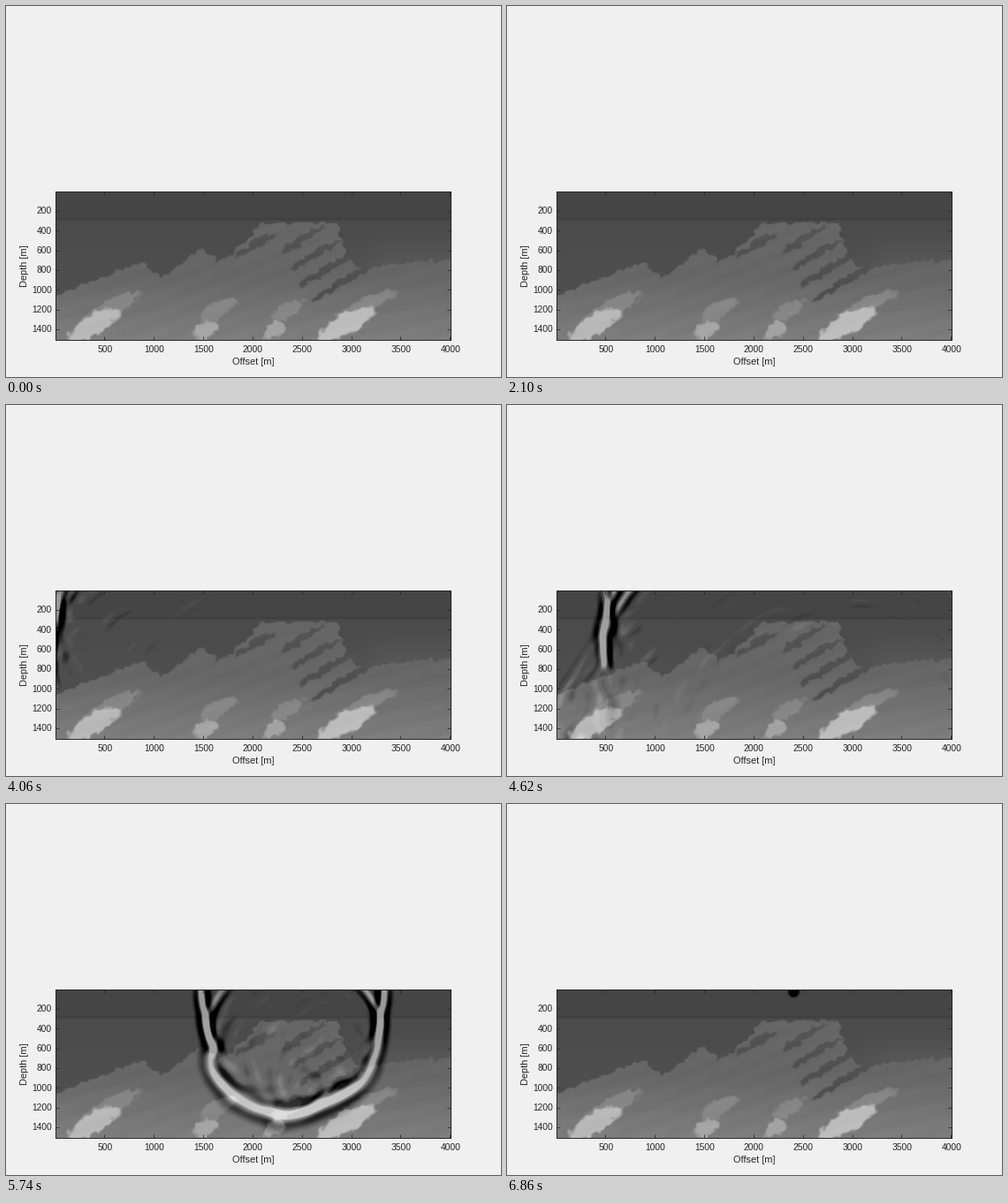
A matplotlib script that plays this animation: 560x420 px, repeating every 7 s.

```python
import numpy as np
import matplotlib.pyplot as plt
from matplotlib.animation import FuncAnimation

W, H, DPI = 560, 420, 100
X0, Y0, NX, NZ = 56, 210, 447, 168      # image box on the stage, in pixels
FRAMES, INTERVAL = 50, 140
DX = 8.95                               # metres per pixel
SPEED = 21.7                            # m/s per grey level
PAD = 45
SUB, FRAME_DT = 64, 0.0815              # solver steps and seconds per frame
LIVE = 34                               # frames with a visible wave
INK = "#262626"

rng = np.random.default_rng(4)
X, Y = np.meshgrid(np.arange(NX) + X0 + 0.5, np.arange(NZ) + Y0 + 0.5)


def blur(a, n):
    for _ in range(n):
        p = np.pad(a, 1, mode="edge")
        a = (p[:-2, 1:-1] + p[2:, 1:-1] + p[1:-1, :-2] + p[1:-1, 2:]
             + 2 * a) / 6
    return a


def noise(n):
    a = blur(rng.standard_normal((NZ, NX)), n)
    return a / a.std()


# ragged coordinates give the layers uneven edges
RX, RY = X + 1.5 * noise(16), Y + 1.2 * noise(10)


def lens(cx, cy, length, thick, slope=0.58, bend=0.002):
    """Soft mask of a dipping, slightly bowed lens."""
    s = np.hypot(1, slope)
    u = (RX - cx - slope * (RY - cy)) / s
    w = (RY - cy + slope * (RX - cx)) / s - bend * u ** 2
    d = (u / length) ** 2 + (w / thick) ** 2
    return blur(np.clip(2.5 * (1.2 - d), 0, 1), 1)


def rock_top(x):
    """Depth of the ridge line between a few corner points."""
    xs = [56, 110, 152, 177, 222, 238, 255, 290, 375, 384, 404, 430, 504]
    ys = [328, 307, 289, 308, 274, 288, 282, 245, 245, 284, 298, 293, 286]
    return np.interp(x, xs, ys)


def rock_model():
    right = np.clip((X - 375) / 60, 0, 1) * np.clip((Y - 250) / 40, 0, 1)
    g = 75 + 3 * np.clip((Y - 262) / 30, 0, 1) + 9 * right
    g = np.where(Y < 243, 69, g)

    deep = np.maximum(102, 100 + 0.33 * (Y - 300))
    m = blur(np.clip(RY - rock_top(RX), 0, 1) * (Y > 244), 1)
    g += m * (deep - g)

    def mix(level, mask):
        return g + mask * (level - g)

    g = mix(83, lens(281, 270, 25, 4.5))
    for i in range(4):                  # dark streaks, stacked down the dip
        g = mix(83 - i, lens(336 + 14 * i, 263 + 17 * i, 30 + 3 * i, 4))
    for x, size in ((100, 34), (226, 15), (304, 13), (384, 38)):
        g = mix(134, lens(x + 14, 344, size + 8, 9))
        g = mix(150 + size, lens(x, 372 - size / 3, size, 7 + size / 9))
    return g


def wavelet(t, freq=12.0):
    """Ricker pulse, half-differentiated to stay symmetric in 2D."""
    a = (np.pi * freq * t) ** 2
    spec = np.fft.rfft((1 - 2 * a) * np.exp(-a))
    w = 2 * np.pi * np.fft.rfftfreq(t.size, t[1] - t[0])
    return np.fft.irfft(spec * np.sqrt(1j * w), t.size)


def laplacian(p, out):
    c = p[2:-2, 2:-2]
    out[2:-2, 2:-2] = (
        16 * (p[1:-3, 2:-2] + p[3:-1, 2:-2] + p[2:-2, 1:-3] + p[2:-2, 3:-1])
        - (p[:-4, 2:-2] + p[4:, 2:-2] + p[2:-2, :-4] + p[2:-2, 4:])
        - 60 * c) / 12
    return out


def propagate(grey):
    """Wave field for each frame interval after the shot."""
    dt = FRAME_DT / SUB
    v = np.pad(np.minimum(grey * SPEED, 4150), PAD, mode="edge")
    courant = ((v * dt / DX) ** 2).astype(np.float32)
    nz, nx = v.shape
    iz, ix = np.arange(nz)[:, None], np.arange(nx)[None, :]
    edge = np.minimum(np.minimum(iz, nz - 1 - iz), np.minimum(ix, nx - 1 - ix))
    sponge = np.exp(-(0.0065 * np.maximum(PAD - edge, 0)) ** 2)
    sponge = sponge.astype(np.float32)

    sz, sx = PAD + 2, PAD + 268
    near = np.s_[sz - 9:sz + 10, sx - 9:sx + 10]
    spot = np.exp(-((iz - sz) ** 2 + (ix - sx) ** 2) / (2 * 2.2 ** 2))
    spot = spot[near].astype(np.float32)

    t = np.arange(4096) * dt - 0.038 - SUB * dt
    src = wavelet(t)
    src /= np.abs(src).max()

    old = np.zeros((nz, nx), np.float32)
    now = np.zeros_like(old)
    lap = np.zeros_like(old)
    shots = []
    for k in range(1, SUB * LIVE + 1):
        new = 2 * now - old + courant * laplacian(now, lap)
        new[near] += np.float32(src[k]) * spot
        new *= sponge
        now *= sponge
        old, now = now, new
        if k % SUB == 0:
            shots.append(now[PAD:-PAD, PAD:-PAD].copy())
    gain = 190 / shots[8][:3].max()
    return [gain * s for s in shots]


model = rock_model()
waves = propagate(blur(model, 10))
strata = 1.5 * np.sin((Y + 110 * np.tanh((X - 250) / 260)) / 3.3)
grey = model + strata * (Y > rock_top(X)) - 4 * np.exp(-((Y - 241) / 1.3) ** 2)


def picture(i):
    n = FRAMES - 1 - i                  # the wave runs back to its source
    if n >= LIVE:
        return grey
    p = waves[n]
    p = np.sign(p) * np.clip(np.abs(p) - 8, 0, 85)
    return np.clip(grey + p, 0, 255)


plt.rcParams["font.family"] = "Liberation Sans"
fig = plt.figure(figsize=(W / DPI, H / DPI), dpi=DPI, facecolor="#f0f0f0")
ax = fig.add_axes([X0 / W, 1 - (Y0 + NZ) / H, NX / W, NZ / H])
img = ax.imshow(picture(0), cmap="gray", vmin=0, vmax=255, aspect="auto",
                interpolation="nearest", extent=(0, NX, NZ, 0))

PX = 72 / DPI
SCALE = 0.1117                          # pixels per metre
xt, yt = np.arange(500, 4001, 500), np.arange(200, 1401, 200)
ax.set_xticks(xt * SCALE - 0.5)
ax.set_yticks(yt * SCALE - 0.4)
ax.tick_params(direction="in", length=4 * PX, width=0.8 * PX, color=INK,
               top=True, right=True, labelbottom=False, labelleft=False)
for side in ax.spines.values():
    side.set(linewidth=PX, edgecolor=INK)


def label(x, y, text, size, **kw):
    kw = {"ha": "center", "va": "center", **kw}
    fig.text(x / W, 1 - y / H, text, fontsize=size * PX, color=INK, **kw)


for d in xt:
    label(X0 + d * SCALE, 389, str(d), 10.2)
for d in yt:
    label(52, Y0 + d * SCALE, str(d), 10.2, ha="right")
label(280, 402.5, "Offset [m]", 11)
label(20.5, 294, "Depth [m]", 11, rotation=90)


def update(i):
    img.set_data(picture(i))
    return [img]


anim = FuncAnimation(fig, update, frames=FRAMES, interval=INTERVAL,
                     repeat=True, repeat_delay=0, blit=False)
plt.show()
```
